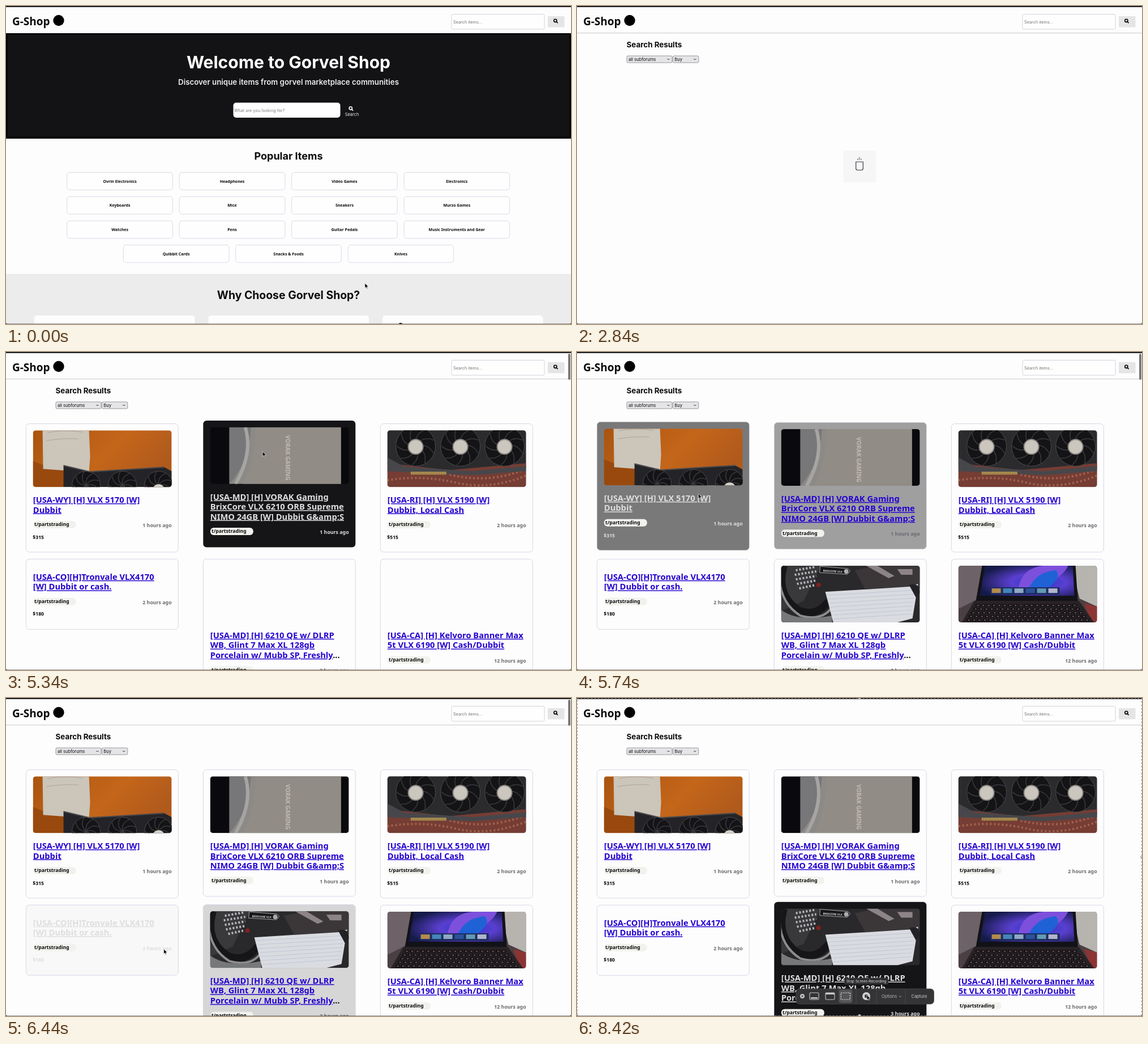
Animation, 998 px wide and 561 px high, one loop 8.44 s. Source, as an HTML page:

```html
<!DOCTYPE html>
<html lang="en">
<head>
<meta charset="utf-8">
<title>Shop search</title>
<style>
  html, body { margin: 0; width: 100%; height: 100%; overflow: hidden; background: #fdfdfd; }
  svg { display: block; width: 998px; height: 561px; }
  text { font-family: Inter, sans-serif; white-space: pre; }
  .b { font-weight: 700; }
  .sans { font-family: "Noto Sans", "Open Sans", sans-serif; font-weight: 700; }
  .mid { text-anchor: middle; }
  .end { text-anchor: end; }
  .link { text-decoration: underline; fill: #2404d0; }
  .time { fill: #6b6b70; font-weight: 600; }
  .hover .link, .hover .time, .hover .price { fill: #dedede; }
</style>
</head>
<body>
<svg id="stage" viewBox="0 0 998 561">
  <defs>
    <clipPath id="photo"><rect width="245" height="100" rx="5"/></clipPath>
    <linearGradient id="cloth" x2="1" y2=".4">
      <stop stop-color="#a9540f"/><stop offset=".6" stop-color="#c4661a"/><stop offset="1" stop-color="#b05a1c"/>
    </linearGradient>
    <radialGradient id="glow" cx=".62" cy=".55" r=".65">
      <stop stop-color="#2436c8"/><stop offset=".45" stop-color="#5a3fd0"/><stop offset="1" stop-color="#151a48"/>
    </radialGradient>
    <g id="lens" fill="none" stroke-width="1.6"><circle cx="-.7" cy="-.7" r="2.6"/><path d="M1.2 1.2L3.6 3.6"/></g>
    <path id="chevron" d="M-2-1L0 1L2-1" fill="none" stroke="#222"/>
  </defs>
  <rect width="998" height="561" fill="#fdfdfd"/>
  <g id="home"></g>
  <g id="results"></g>
  <g id="header"></g>
  <g id="recorder"></g>
  <path id="cursor" d="M0 0V8.4L2 6.7L3.3 9.6L4.7 9L3.4 6.2L6 6Z" fill="#000" stroke="#fff" stroke-width=".6"/>
</svg>
<script>
const LOOP = 8440, RESULTS_AT = 2100, CARDS_AT = 4940, RECORDER_AT = 7600, TOOLTIP_AT = 8250, FADE = 300;
const $ = id => document.getElementById(id);
const esc = s => s.replace(/&/g, '&amp;');
const rect = (x, y, w, h, fill, rest = '') => `<rect x="${x}" y="${y}" width="${w}" height="${h}" fill="${fill}" ${rest}/>`;
const circle = (x, y, r, fill, rest = '') => `<circle cx="${x}" cy="${y}" r="${r}" fill="${fill}" ${rest}/>`;
const path = (d, fill, rest = '') => `<path d="${d}" fill="${fill}" ${rest}/>`;
const line = (d, stroke, width = 1, rest = '') => path(d, 'none', `stroke="${stroke}" stroke-width="${width}" ${rest}`);
const text = (x, y, size, s, cls = '', fill = '#0b0b0d', rest = '') =>
  `<text x="${x}" y="${y}" font-size="${size}" class="${cls}" fill="${fill}" ${rest}>${esc(s)}</text>`;
const use = (id, x, y, stroke = '#000') => `<use href="#${id}" x="${x}" y="${y}" stroke="${stroke}"/>`;
const show = (id, on) => { $(id).style.display = on ? '' : 'none'; };

function buildHeader() {
  $('header').innerHTML =
    rect(0, 0, 998, 2, '#1f1f24') +
    text(11, 34, 19, 'G-Shop', 'sans') + circle(93, 25.5, 9.7, '#000') +
    rect(787, 14.5, 164, 26.5, '#fefefe', 'rx="2.5" stroke="#d2d2de"') +
    text(790, 30.7, 7.3, 'Search items...', '', '#757575') +
    rect(957, 18, 29.5, 19.5, '#e5e5e6', 'rx="1"') + use('lens', 971, 26.5) +
    line('M0 560.7H998', '#55555a', .7) + path('M0 558Q0 561 3 561H0ZM998 558Q998 561 995 561H998Z', '#111');
}

function buildHome() {
  const rows = [
    ['Ovrin Electronics', 'Headphones', 'Video Games', 'Electronics'],
    ['Keyboards', 'Mice', 'Sneakers', 'Murzo Games'],
    ['Watches', 'Pens', 'Guitar Pedals', 'Music Instruments and Gear'],
    ['Quibbit Cards', 'Snacks & Foods', 'Knives']
  ];
  const categories = rows.map((row, r) => row.map((name, c) => {
    const x = (row.length < 4 ? 207.3 : 107.8) + c * 198.4, y = 293.5 + r * 42.7;
    return rect(x, y, 186.6, 31, '#fefefe', 'rx="5" stroke="#d9d9e8"') +
      text(x + 93.3, y + 18, 7, name, 'sans mid');
  }).join('')).join('');
  $('home').innerHTML =
    rect(0, 48, 998, 186, '#000') + rect(2.5, 51, 993, 179.5, '#131315') +
    text(499, 110, 30, 'Welcome to Gorvel Shop', 'b mid', '#fff') +
    text(499, 139, 13.3, 'Discover unique items from gorvel marketplace communities', 'mid', '#ececec', 'font-weight="600"') +
    rect(401.5, 170.5, 189, 26.5, '#fff', 'rx="5"') +
    '<text id="query" x="403" y="186.7" font-size="7.2" letter-spacing=".1"></text>' +
    use('lens', 609.5, 181, '#fff') + text(611, 194, 7.4, 'Search', 'mid', '#eee') +
    text(499, 271, 18, 'Popular Items', 'b mid') + categories +
    rect(0, 473, 998, 88, '#ececed') +
    text(499, 517, 19.4, 'Why Choose Gorvel Shop?', 'b mid') +
    [50, 357.5, 665].map(x => rect(x, 546, 283.5, 30, '#fdfdfd', 'rx="5"')).join('') +
    circle(697, 563, 4, '#000') + line('M0 473.5H998', '#e4e4e6');
}

const fan = (x, y, r) => circle(x, y, r, '#141417', 'stroke="#4a4a4e"') +
  [0, 1, 2, 3, 4, 5, 6, 7, 8].map(i =>
    line(`M0 0Q${r * .6} ${-r * .2} ${r * .9} ${r * .35}`, '#39393d', 1.5, `transform="translate(${x} ${y}) rotate(${i * 40})"`)).join('');

const photos = {
  cardOnCloth: () => rect(0, 0, 245, 100, 'url(#cloth)') +
    path('M0 54Q50 76 100 70L54 100H0Z', '#99490d') + path('M17 0H99L101 46L99 74L18 68Z', '#cbc5ba') +
    line('M26 4Q50 -2 88 3M24 18Q55 13 80 15', '#aaa49c', 1) +
    path('M54 62L100 73L232 65L245 72V100H54Z', '#242428') +
    [94, 158, 222].map(x => fan(x, 97, 25)).join('') + circle(222, 106, 11, '#d6d1c8') + line('M54 62L100 73L232 65', '#4b4a4c', 2),
  box: () => rect(0, 0, 245, 100, '#0a0a0e') + rect(34, 0, 197, 100, '#8c8a86') +
    path('M34 0H72Q70 60 34 100Z', '#77777a') + line('M62 0Q76 45 45 100', '#a7a5a2', 6) +
    path('M80 0H231V100H58Q82 55 80 0Z', '#918d86') +
    text(0, 0, 10, 'VORAK GAMING', 'sans', '#c2bbb0', 'transform="translate(133 14) rotate(90)"'),
  fans: () => rect(0, 0, 245, 100, '#55524f') + path('M0 0H245V66L120 72L0 60Z', '#2b2b2e') +
    path('M0 58L110 70L245 58V100H0Z', '#753d34') +
    line('M0 88Q60 78 120 92T245 80M110 78Q180 95 245 68', '#a2604d', 4, 'stroke-dasharray="3 4"') +
    path('M0 48L30 64L150 72L245 63V72L150 79L0 72Z', '#47474b') +
    [50, 129, 207].map(x => fan(x, 28, 35) + circle(x, 29, 13, '#cbc6be', 'stroke="#8b8782" stroke-width="2"')).join('') +
    rect(41, 73, 63, 5, '#bd9b58') + line('M41 76H104', '#6d5a35', 4, 'stroke-dasharray="1 2"'),
  notebook: () => rect(0, 0, 245, 100, '#29282b') + path('M0 0H70L40 62L0 80Z', '#39393c') +
    line('M26 8L60 2M24 16L62 10M26 24L62 18M28 32L62 26M32 40L60 34', '#b6b6ba', 4, 'stroke-dasharray="3 3"') +
    line('M5 0Q-10 50 30 78Q62 92 84 62', '#161618', 13) + line('M-2 4Q-8 62 34 88Q70 98 88 76', '#8d8d90', 4) +
    path('M0 78Q30 100 90 88V100H0Z', '#77787a') + circle(66, 34, 4, '#7d2220') +
    path('M130 8L170 0H245V40L150 44Z', '#3b3739') + path('M150 0L190 22L200 18L170 0ZM205 6H232V16H212Z', '#8d8488') +
    path('M69 1L118 5L122 9L117 15L68 12Z', '#17171a', 'stroke="#aaa"') + circle(115, 10, 4, '#aaa') +
    text(74, 10.5, 4.8, 'BRIXCORE VLX', 'sans', '#ddd', 'transform="rotate(3 74 10)"') +
    path('M78 46L226 37L242 32L232 93L205 100H92Z', '#d9dbe0') +
    [0, 1, 2, 3, 4, 5, 6].map(i => line(`M${80 + i * 2} ${52 + i * 7}L${238 - i * 1.5} ${43 + i * 7}`, '#b4bdd2', .7)).join('') +
    path('M226 34Q245 28 245 48L238 56Z', '#222226'),
  laptop: () => rect(0, 0, 245, 100, '#4a3f42') + path('M200 0H245V72L214 58Z', '#b7b4b0') +
    path('M0 0H42L32 60L0 76Z', '#6d6267') + path('M222 66L245 72V100H235Z', '#8c3434') +
    path('M42 0H207L211 62H31Z', '#121218') + path('M47 0H202L205 53H38Z', 'url(#glow)') +
    path('M106 40Q112 4 150 0H194Q178 34 106 40Z', '#7d50dc') + path('M125 38Q140 10 172 8Q184 20 160 38Z', '#1f62d6') +
    rect(57, 38, 122, 13, '#1d2c61') +
    ['#d9a34a', '#4f9bd0', '#a9c9dd', '#315da8', '#74b6c8', '#d6d9e6'].map((c, i) => rect(59 + i * 20, 40, 16, 8, c, 'opacity=".8"')).join('') +
    path('M28 62H213L240 100H6Z', '#292326') +
    [0, 1, 2, 3, 4].map(i => line(`M${30 - i * 4} ${70 + i * 6.5}H${211 + i * 5}`, '#15131a', 5, 'stroke-dasharray="8 1.5"') +
      line(`M${33 - i * 4} ${70 + i * 6.5}H${211 + i * 5}`, '#8b6a57', 1.5, 'stroke-dasharray="3 6.5"')).join('')
};

// hover: [enter, leave] spans of the pointer
const cards = [
  { x: 35.3, y: 126.5, h: 226.5, photo: 'cardOnCloth', title: ['[USA-WY] [H] VLX 5170 [W]', 'Dubbit'], age: 1, price: '$315', hover: [[5642, 6000]] },
  { x: 348.3, y: 126.5, h: 223.5, photo: 'box', title: ['[USA-MD] [H] VORAK Gaming', 'BrixCore VLX 6210 ORB Supreme', 'NIMO 24GB [W] Dubbit G&amp;S'], age: 1, hover: [[4995, 5638]] },
  { x: 661.3, y: 126.5, h: 226.5, photo: 'fans', title: ['[USA-RI] [H] VLX 5190 [W]', 'Dubbit, Local Cash'], age: 2, price: '$515', hover: [] },
  { x: 35.3, y: 365.3, h: 124, title: ['[USA-CO][H]Tronvale VLX4170', '[W] Dubbit or cash.'], age: 2, price: '$180', hover: [[6430, 6700]] },
  { x: 348.3, y: 365.3, h: 226, photo: 'notebook', title: ['[USA-MD] [H] 6210 QE w/ DLRP', 'WB, Glint 7 Max XL 128gb', 'Porcelain w/ Mubb SP, Freshly'], more: true, age: 3, hover: [[6080, 6285], [6760, LOOP]] },
  { x: 661.3, y: 365.3, h: 226, photo: 'laptop', title: ['[USA-CA] [H] Kelvoro Banner Max', '5t VLX 6190 [W] Cash/Dubbit'], age: 12, hover: [] }
];

function cardMarkup(card, i) {
  const top = card.photo ? 139.5 : 36.5, below = top + card.title.length * 17.5;
  const title = card.title.map((s, n) => {
    const dots = card.more && n === card.title.length - 1 ? '<tspan fill="#111">...</tspan>' : '';
    return `<text class="sans" x="12.5" y="${top + n * 17.5}" font-size="14.7"><tspan class="link">${esc(s)}</tspan>${dots}</text>`;
  }).join('');
  return `<g id="card${i}">` +
    rect(0, 0, 269, card.h, '#fdfdfd', `id="back${i}" rx="6"`) +
    (card.photo ? `<g id="photo${i}" transform="translate(12.3 11.8)" clip-path="url(#photo)">${photos[card.photo]()}</g>` : '') +
    title +
    rect(12.5, below - 3, 76, 13, '#f1f1ed', 'rx="6"') + text(14.7, below + 6.3, 8.6, 't/partstrading', 'sans') +
    text(257.3, below + 8, 8.8, `${card.age} hours ago`, 'sans time end') +
    (card.price ? text(12, below + 28.7, 8.6, card.price, 'sans price') : '') + '</g>';
}

function buildResults() {
  const select = (x, w, label) => rect(x, 88, w, 12, '#e5e5e8', 'rx="2" stroke="#808086" stroke-width=".8"') +
    text(x + 3, 96.8, 7.6, label) + use('chevron', x + w - 6.5, 94);
  $('results').innerHTML =
    line('M0 47.7H998', '#c9c9cc') +
    text(87.5, 73, 13.4, 'Search Results', 'b') +
    select(88, 80, 'all subforums') + select(169.3, 45.5, 'Buy') +
    '<g id="loader">' + rect(470.5, 255, 57.5, 56, '#f6f6f7') +
    line('M492.7 275H505.3V286.5Q505.3 289.5 502.3 289.5H495.7Q492.7 289.5 492.7 286.5Z', '#3a3a44', 1.2) +
    line('M495.8 269V272M498.8 266.5V271.5M501.8 269V272', '#55555f', 1, 'id="vapour"') + '</g>' +
    `<g id="cards">${cards.map(cardMarkup).join('')}</g>` +
    rect(993, 3, 4, 46, '#77777b', 'id="thumb" rx="2"');
}

function buildRecorder() {
  const tool = (x, inner) => rect(x - 8, 520, 16, 12, 'none', 'rx="1.5" stroke="#c8c8ca" stroke-width="1.1"') + inner;
  $('recorder').innerHTML =
    rect(.5, .5, 997, 560, 'none', 'stroke="#88888c" stroke-dasharray="3 3"') +
    [[499, 1], [1, 281], [997, 281], [499, 560]].map(([x, y]) => circle(x, y, 2.3, '#bbb')).join('') +
    rect(387, 513, 243.5, 27, '#343437', 'rx="6" stroke="#4b4b4e" stroke-width=".7"') +
    circle(398, 526, 4, '#c2c2c4') + line('M396.5 524.5L399.5 527.5M399.5 524.5L396.5 527.5', '#343437', 1) +
    rect(462.5, 514.5, 24, 23.5, '#555558', 'rx="4"') +
    tool(419, rect(413, 528, 12, 2.5, '#c8c8ca')) + tool(447, rect(439, 520, 16, 3, '#c8c8ca')) +
    rect(466.3, 520, 16, 12, 'none', 'stroke="#e2e2e4" stroke-width="1.2" stroke-dasharray="2.5 1.5"') +
    line('M493 513V540M529 513V540M580 513V540', '#4c4c4f', .8) +
    circle(511, 526, 7, '#d0d0d2') + rect(508.3, 523.3, 5.4, 5.4, '#343437', 'rx="1"') +
    text(538, 529, 7.4, 'Options', '', '#b4b4b7') + line('M569 525.5L571 527.5L573 525.5', '#b4b4b7', .9) +
    text(590.5, 529, 7.4, 'Capture', '', '#c9c9cc') +
    '<g id="tooltip">' + rect(472.5, 494, 77, 10.5, '#2c2c2f', 'rx="1.5" stroke="#505053" stroke-width=".6"') +
    text(511, 501.7, 6.5, 'Stop Screen Recording', 'mid', '#e6e6e8') + '</g>';
}

// CSS "ease" curve
function ease(p) {
  if (p <= 0) return 0;
  if (p >= 1) return 1;
  let lo = 0, hi = 1, s = .5;
  for (let i = 0; i < 18; i++) {
    s = (lo + hi) / 2;
    const x = .75 * s * (1 - s) ** 2 + .75 * s * s * (1 - s) + s ** 3;
    if (x < p) lo = s; else hi = s;
  }
  return .3 * s * (1 - s) ** 2 + 3 * s * s * (1 - s) + s ** 3;
}

const hoverLevel = (spans, t) => spans.reduce((level, [enter, leave]) => {
  if (t < enter) return level;
  const risen = ease((Math.min(t, leave) - enter) / FADE);
  return t < leave ? risen : risen * (1 - ease((t - leave) / FADE));
}, 0);

const pointer = [
  [0, 634, 489], [20, 634, 489], [500, 478, 182], [3440, 478, 182], [3850, 148, 72], [4280, 380, 150],
  [4700, 480, 167], [5020, 480, 167], [5500, 440, 180], [5640, 326, 224], [5740, 214.5, 250],
  [5880, 200, 272], [6000, 302, 346], [6080, 350, 372], [6180, 385, 408], [6285, 347, 425],
  [6420, 306, 440], [6440, 279, 443], [6580, 240, 442], [6700, 306, 434], [6760, 350, 428],
  [6900, 420, 419], [7100, 427, 417], [7600, 432, 422], [8150, 512, 524], [LOOP, 512, 524]
];

function pointerAt(t) {
  const i = Math.max(1, pointer.findIndex(k => k[0] > t));
  const [t0, x0, y0] = pointer[i - 1], [t1, x1, y1] = pointer[i];
  const p = (t - t0) / (t1 - t0);
  return [x0 + (x1 - x0) * p, y0 + (y1 - y0) * p];
}

function renderCards(t) {
  cards.forEach((card, i) => {
    const level = hoverLevel(card.hover, t);
    const mix = (a, b) => Math.round(a + (b - a) * level);
    $('card' + i).setAttribute('transform', `translate(${card.x} ${card.y - 5.5 * level})`);
    $('card' + i).setAttribute('class', card.hover.some(([a, b]) => t >= a && t < b) ? 'hover' : '');
    $('back' + i).setAttribute('fill', `rgb(${mix(253, 21)},${mix(253, 21)},${mix(253, 24)})`);
    $('back' + i).setAttribute('stroke', `rgba(215,215,232,${1 - level})`);
    if (card.photo) show('photo' + i, t >= 5200 + i * 40);
  });
}

function render(t) {
  show('home', t < RESULTS_AT);
  show('results', t >= RESULTS_AT);
  show('loader', t < CARDS_AT);
  show('cards', t >= CARDS_AT);
  show('thumb', t >= 5160 && t < RECORDER_AT);
  show('recorder', t >= RECORDER_AT);
  show('tooltip', t >= TOOLTIP_AT);
  show('cursor', t < 900 || t >= 3440);

  const typed = 'gpu'.slice(0, Math.max(0, Math.floor((t - 650) / 250)));
  $('query').textContent = typed || 'What are you looking for?';
  $('query').setAttribute('fill', typed ? '#111' : '#757575');
  $('vapour').setAttribute('transform', `translate(0 ${-1.2 * Math.sin((t - 2840) / 250)})`);
  $('cursor').setAttribute('transform', `translate(${pointerAt(t)})`);
  renderCards(t);
}

buildHeader();
buildHome();
buildResults();
buildRecorder();

const start = performance.now();
function tick() {
  render((performance.now() - start) % LOOP);
  requestAnimationFrame(tick);
}
tick();
</script>
</body>
</html>
```
